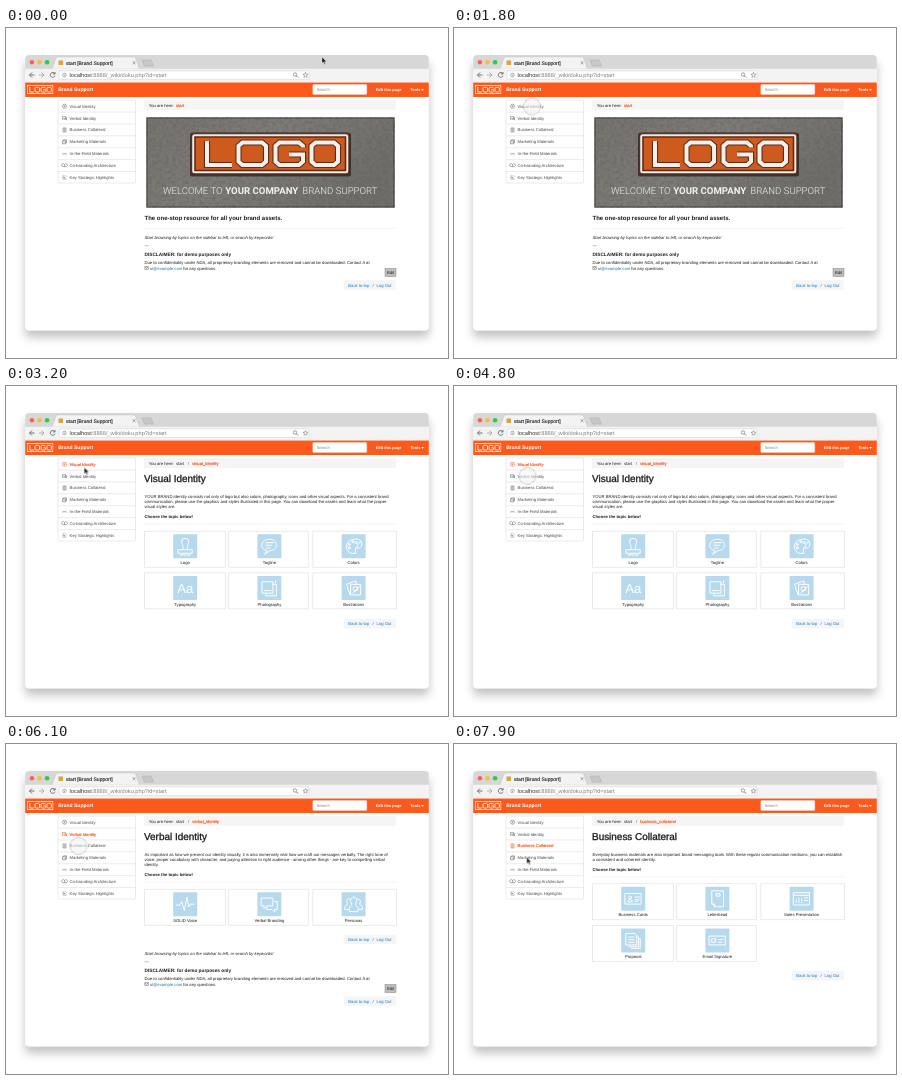
An HTML page that plays this animation: 442x330 px, repeating every 8 s.

```html
<!DOCTYPE html>
<html lang="en">
<head>
<meta charset="utf-8">
<title>Brand Support</title>
<style>
html, body { margin: 0; width: 100%; height: 100%; overflow: hidden; background: #fff; }
svg { display: block; width: 442px; height: 330px; }
text { font: 4.2px "Liberation Sans", Arial, sans-serif; fill: #1c1c1c; text-rendering: geometricPrecision; white-space: pre; }
.b { font-weight: bold; }
.i { font-style: italic; }
.h { font-size: 9.95px; fill: #1c1c1c; stroke: #1c1c1c; stroke-width: .32px; }
.w { font-size: 3.95px; font-weight: bold; fill: #fff; }
.o { fill: #f4571d; stroke: #f4571d; stroke-width: .16px; }
.l { fill: #1f76bb; }
.g { fill: #4a4a4a; }
.s { font: 300 9.6px Roboto, sans-serif; fill: #f3f2f0; }
.line { fill: none; stroke: #ddd; stroke-width: .6; }
.icon { fill: none; stroke: #fff; stroke-width: 1.1; stroke-linejoin: round; stroke-linecap: round; }
.mini { fill: none; stroke: #666; stroke-width: .55; }
.tool { fill: none; stroke: #666; stroke-width: .9; }

.page { visibility: hidden; animation: 8s step-end infinite; }
.start { animation-name: start; }
.visual { animation-name: visual; }
.verbal { animation-name: verbal; }
.business { animation-name: business; }
@keyframes start { 0% { visibility: visible } 23.75%, 100% { visibility: hidden } }
@keyframes visual { 0% { visibility: hidden } 23.75% { visibility: visible } 61.25%, 100% { visibility: hidden } }
@keyframes verbal { 0% { visibility: hidden } 61.25% { visibility: visible } 81.25%, 100% { visibility: hidden } }
@keyframes business { 0% { visibility: hidden } 81.25%, 100% { visibility: visible } }

.pointer { animation: move 8s ease-in-out infinite; }
.arrow { animation: arrow 8s step-end infinite; }
.ring { opacity: 0; animation: ring 8s linear infinite; }
@keyframes move {
  0% { transform: translate(316px, 29px) }
  20.5%, 35% { transform: translate(78px, 78.5px) }
  40% { transform: translate(78.3px, 81.5px) }
  57%, 68.75% { transform: translate(73.5px, 90px) }
  74.5%, 90.5% { transform: translate(72.5px, 102px) }
  98.5%, 100% { transform: translate(72.7px, 113.3px) }
}
@keyframes arrow {
  0% { opacity: 1 } 21.25% { opacity: 0 } 28.75% { opacity: 1 }
  58.75% { opacity: 0 } 63.75% { opacity: 1 }
  75% { opacity: 0 } 86.25%, 100% { opacity: 1 }
}
@keyframes ring {
  0%, 21% { opacity: 0 } 22%, 23.7% { opacity: 1 } 28.75%, 58.4% { opacity: 0 }
  59.5%, 61.2% { opacity: 1 } 63.75%, 74.8% { opacity: 0 }
  75.6%, 81.2% { opacity: 1 } 86.25%, 100% { opacity: 0 }
}
</style>
</head>
<body>
<svg id="stage" viewBox="0 0 442 330" xmlns="http://www.w3.org/2000/svg"></svg>
<script>
const t = (x, y, s, c = '', more = '') => `<text x="${x}" y="${y}" class="${c}" ${more}>${s}</text>`;
const r = (x, y, w, h, fill, more = '') => `<rect x="${x}" y="${y}" width="${w}" height="${h}" fill="${fill}" ${more}/>`;
const p = (d, more = '') => `<path d="${d}" ${more}/>`;
const size = n => `style="font-size:${n}px"`;

const icons = {
  Logo: p('M-8 4H8V8H-8ZM-6 10H6M-3 4C-1 0-4-2-4-5A4 4 0 0 1 4-5C4-2 1 0 3 4'),
  Tagline: p('M-3 5C-12 4-10-8 0-8S11 4 1 5L-5 9ZM-4-4H5M-4-1H3M-4 2H1'),
  Colors: p('M2 8C-10 11-12-6 0-8S11 3 5 2S4 7 2 8ZM2 3L8-6')
    + [[-5, 2], [-5, -2], [-1, -5], [3, -4]].map(([x, y]) => `<circle cx="${x}" cy="${y}" r="1.2"/>`).join(''),
  Typography: `<text x="0" y="5.4" text-anchor="middle" style="font-size:15px;fill:#fff;stroke:none">Aa</text>`,
  Photography: p('M-8-7H4V6H-8ZM4-4H8V9H-4V6M-6 3H2M7-8V-6'),
  Illustrations: p('M-8-4L2-8L4-4M-8-4L-4 8M-3-4H8V8H-3ZM-1 6L7-2') + '<circle cx="2" cy="1" r="2.6"/>',
  'SOLID Voice': p('M-10 1H-6L-4-3L-1 7L2-8L4 3L6 0H10'),
  'Verbal Branding': p('M-9-7H4V2H-3L-6 5V2H-9ZM6-3H9V6H6V9L3 6H-3V4'),
  Personas: p('M-5 8V5C-5 2-2 2-2 0C-5-4-3-8 0-8S5-4 2 0C2 2 5 2 5 5V8ZM-6 6H-10V3C-9 1-6 1-7-1C-9-4-7-6-4-6M6 6H10V3C9 1 6 1 7-1C9-4 7-6 4-6'),
  'Business Cards': p('M-9-6H9V6H-9ZM-6 3C-6 0-1 0-1 3ZM2-2H7M2 1H7M2 3H5') + '<circle cx="-3.5" cy="-1.5" r="1.7"/>',
  Letterhead: p('M-6-9H7V9H-3L-6 6ZM-6 6H-3V9M-1-6H3V-3H-1Z'),
  'Sales Presentation': p('M-9-7H9V7H-9ZM-9-4H9M-6 4V1M-3 4V-1M0 4V0M3-1H7M3 2H7'),
  Proposal: p('M-8-8H2L4-6V5H-8ZM4-4H6V7H-5M6-2H8V9H-2M-5-4H1M-5-1H1M-5 2H1'),
  'Email Signature': p('M-9-5H9V5H-9ZM-6-2H-2V2H-6ZM1-1H6M1 2H5')
};

const menu = [
  ['Visual Identity', 'M-2 0A2 2 0 1 0 2 0A2 2 0 1 0-2 0M-.7 0H.7M0-.7V.7'],
  ['Verbal Identity', 'M-2-1.5H1V.7H-1L-2 1.5ZM1-.5H2V2L1 1H-.5'],
  ['Business Collateral', 'M-1.5-2H1.5V2H-1.5ZM-.7-1H.7M-.7 0H.7M-.7 1H.7'],
  ['Marketing Materials', 'M-2-1H1V2H-2ZM-1-1V-2H2V1H1M-1 .5H0'],
  ['In-the-Field Materials', 'M-2-1L-1 0L-2 1M2-1L1 0L2 1M-1 0H1'],
  ['Co-branding Architecture', 'M-2 1A1.5 1.5 0 1 1 0-1A1.5 1.5 0 1 1 2 1ZM0-1V1'],
  ['Key Strategic Highlights', 'M-2-1.5H0M-2 0H1M-2 1.5H2M1-2L2-1']
];

const sidebar = active => r(52, 72, 77.5, 83, '#fff', 'class="line" rx="1"')
  + menu.map(([name, d], i) => {
    const y = 78.2 + i * 11.88;
    return (i ? p(`M52 ${y - 6}H129.5`, 'class="line"') : '')
      + p(d, `class="mini" transform="translate(58.5 ${y})"${i === active ? ' style="stroke:#f4571d"' : ''}`)
      + t(63.6, y + 1.5, name, i === active ? 'o' : 'g');
  }).join('');

const crumbs = id => r(138, 72, 252, 10, '#f5f5f5', 'rx="1"') + t(142.8, 79, 'You are here:')
  + (id ? t(170, 79, 'start') + t(182, 79, '/', 'g') + t(186.2, 79, id, 'o') : t(170, 79, 'start', 'o'));

const links = y => r(338, y, 52, 9.6, '#f4f5f6', 'rx="1"') + t(342.3, y + 6.3, 'Back to top', 'l')
  + t(366.5, y + 6.3, '/', 'g') + t(370.6, y + 6.3, 'Log Out', 'l');

const card = (name, i, top) => {
  const x = 138.5 + i % 3 * 84.2, y = top + (i > 2 ? 41.7 : 0);
  return r(x, y, [81, 79.5, 83.5][i % 3], 36, '#fff', 'class="line"')
    + `<g class="icon" transform="translate(${x + 40.7} ${y + 15})">${r(-12, -12, 24, 24, '#b7d9ed', 'stroke="none" rx="1"')}<g transform="scale(.88)">${icons[name]}</g></g>`
    + t(x + 40.7, y + 32.6, name, '', 'text-anchor="middle"');
};

const footer = t(138.5, 211, 'Start browsing by topics on the sidebar to left, or search by keywords!', 'i')
  + t(138.5, 219.3, '—')
  + t(138.5, 227.8, 'DISCLAIMER: for demo purposes only', 'b', size(4.75))
  + t(138.5, 236.4, 'Due to confidentiality under NDA, all proprietary branding elements are removed and cannot be downloaded. Contact A at')
  + p('M138.8 238.7H142.3V241.4H138.8ZL140.5 240.3L142.3 238.7', 'class="mini"')
  + t(143.8, 241.6, 'al@example.com', 'l') + t(177.3, 241.6, 'for any questions.')
  + r(379, 240.5, 11, 8, '#bdbdbd', 'stroke="#888" stroke-width=".5"') + t(380.9, 246, 'Edit')
  + links(252.2);

const topic = (cls, active, title, lines, top, names, linkY, extra = '') => `<g class="page ${cls}">`
  + sidebar(active) + crumbs(title.toLowerCase().replace(' ', '_')) + t(138, 96.4, title, 'h')
  + lines.map((s, i) => t(138.5, 111.8 + i * 5.2, s)).join('')
  + t(138.5, top - 13.3, 'Choose the topic below!', 'b')
  + p(`M138 ${top - 7}H390`, 'class="line" style="stroke:#eee"')
  + names.map((n, i) => card(n, i, top)).join('') + links(linkY) + extra + '</g>';

const banner = r(140.5, 89.5, 248, 90, 'url(#concrete)') + r(140.5, 89.5, 248, 90, '#000', 'filter="url(#grain)" opacity=".5"')
  + r(141, 90, 247, 89, 'none', 'stroke="#454340" stroke-width="1"')
  + r(184, 105, 161, 43.5, '#221d1b', 'rx="2" opacity=".7"')
  + r(185, 105, 158.5, 41.5, '#cf5a1d', 'rx="2" stroke="#3c2a22" stroke-width="1.2"')
  + r(187.5, 107.5, 153.5, 36.5, 'none', 'rx="1.5" stroke="#5a2d18" stroke-width="4.6"')
  + r(187.2, 107.2, 154.1, 37.1, 'none', 'rx="1.5" stroke="#efe9e4" stroke-width="2"')
  + '<use href="#mark" fill="none" stroke="#5a2d18" stroke-width="6.2"/>'
  + '<use href="#mark" fill="none" stroke="#f5efe9" stroke-width="4"/>'
  + t(157, 166.3, 'WELCOME TO', 's') + t(219.3, 166.3, 'YOUR COMPANY', 's', 'style="font-weight:700"')
  + t(296.3, 166.3, 'BRAND SUPPORT', 's');

const defs = `<defs>
<linearGradient id="concrete" x2="1" y2=".4"><stop stop-color="#76736f"/><stop offset=".5" stop-color="#7f7c78"/><stop offset="1" stop-color="#706d6a"/></linearGradient>
<filter id="grain" x="0" y="0" width="1" height="1"><feTurbulence type="fractalNoise" baseFrequency=".3" numOctaves="3" seed="4"/><feColorMatrix values="0 0 0 0 .12  0 0 0 0 .12  0 0 0 0 .11  2.6 0 0 0 -1"/></filter>
<filter id="shade" x="-10%" y="-10%" width="120%" height="125%"><feDropShadow dx="0" dy="7" stdDeviation="5" flood-opacity=".24"/></filter>
<path id="mark" d="M201 113V137H226M236.5 114.5H256L260 118V133.5L256 137H236.5L232.5 133.5V118ZM297 119.5V118L293 114.5H273.5L269.5 118V133.5L273.5 137H293L297 133.5V126.5H283M309.5 114.5H328L332 118V133.5L328 137H309.5L305.5 133.5V118Z"/>
</defs>`;

const lights = ['#fc605c', '#fdbc40', '#34c84a'].map((c, i) => `<circle cx="${25.9 + i * 7.6}" cy="34.2" r="2.3" fill="${c}"/>`).join('');

const chrome = r(19.2, 27, 403.6, 275.3, '#fff', 'rx="4" filter="url(#shade)"')
  + p('M19.2 41V31Q19.2 27 23.2 27H418.8Q422.8 27 422.8 31V41Z', 'fill="#d8d7d8"') + lights
  + p('M46 41L50 30Q50.5 29 52 29H127.5Q129 29 129.5 30L133.5 41Z', 'fill="#f3f3f3" stroke="#bbb" stroke-width=".4"')
  + p('M136 32H145L147.5 38H138.5Z', 'fill="#c8c8c8" stroke="#aaa" stroke-width=".5"')
  + r(52.5, 32.5, 4.5, 4.5, '#d9a441') + t(60, 36.7, 'start [Brand Support]', '', 'style="font-size:5.05px;stroke:#1c1c1c;stroke-width:.12"')
  + p('M126.7 33.3L129.5 36.1M129.5 33.3L126.7 36.1', 'class="tool" style="stroke-width:.6"')
  + r(19.2, 40.8, 403.6, 13.2, '#f3f3f3')
  + p('M28.5 47H23.5M26 44.5L23.5 47L26 49.5', 'class="tool"')
  + p('M33 47H38M35.5 44.5L38 47L35.5 49.5', 'class="tool" style="stroke:#aaa"')
  + p('M48.7 45.5A2.4 2.4 0 1 0 49 47.7M49 44V46H47', 'class="tool"')
  + r(53, 42.8, 250, 8.6, '#fff', 'rx="1.5" stroke="#ccc" stroke-width=".5"')
  + '<circle cx="58.5" cy="47" r="1.8" class="tool" style="stroke-width:.5"/>'
  + p('M58.5 46.8V48M58.5 45.9V46.3', 'class="tool" style="stroke-width:.5"')
  + t(63.5, 48.9, '<tspan fill="#333">localhost</tspan>:8888/_wiki/doku.php?id=start', '', 'style="font-size:5.65px;fill:#808080"')
  + '<circle cx="289" cy="46.5" r="1.7" class="tool" style="stroke-width:.6"/>'
  + p('M290.3 47.8L292 49.5', 'class="tool"')
  + p('M299.5 44.4L300.2 46.2L302.1 46.3L300.6 47.5L301.1 49.4L299.5 48.3L297.9 49.4L298.4 47.5L296.9 46.3L298.8 46.2Z', 'class="tool" style="stroke-width:.5"')
  + r(19.2, 54.5, 403.6, 14.5, '#fb5a1c')
  + `<g transform="translate(21.2 57) scale(.164 .21) translate(-185 -103.5)" fill="none" stroke="#fff">${r(187, 106, 154.5, 38, 'none', 'stroke-width="3.5"')}<use href="#mark" stroke-width="4.5"/></g>`
  + t(52.2, 63.3, 'Brand Support', 'w', size(5))
  + r(306.8, 56.5, 54, 10, '#fff', 'rx="1" stroke="#ddd" stroke-width=".4"') + t(310.5, 63, 'Search', '', 'style="fill:#888"')
  + t(369.7, 63, 'Edit this page', 'w') + t(404.2, 63, 'Tools', 'w')
  + p('M415 61H418.2L416.6 62.8Z', 'fill="#fff"');

const startPage = `<g class="page start">${sidebar(-1)}${crumbs('')}${banner}`
  + t(138.5, 192.2, 'The one-stop resource for all your brand assets.', 'b', size(6))
  + p('M138 200.5H390', 'class="line" style="stroke:#eee"') + footer + '</g>';

const pages = startPage
  + topic('visual', 0, 'Visual Identity', [
    'YOUR BRAND identity consists not only of logo but also colors, photography, icons and other visual aspects. For a consistent brand',
    'communication, please use the graphics and styles illustrated in this page. You can download the assets and learn what the proper',
    'visual styles are.'
  ], 145.2, ['Logo', 'Tagline', 'Colors', 'Typography', 'Photography', 'Illustrations'], 232.8)
  + topic('verbal', 1, 'Verbal Identity', [
    'As important as how we present our identity visually, it is also immensely vital how we craft our messages verbally. The right tone of',
    'voice, proper vocabulary with character, and paying attention to right audience - among other things - are key to compelling verbal',
    'identity.'
  ], 145.2, ['SOLID Voice', 'Verbal Branding', 'Personas'], 190.7, footer)
  + topic('business', 2, 'Business Collateral', [
    'Everyday business materials are also important brand messaging tools. With these regular communication mediums, you can establish',
    'a consistent and coherent identity.'
  ], 139.8, ['Business Cards', 'Letterhead', 'Sales Presentation', 'Proposal', 'Email Signature'], 226.8);

const pointer = `<g class="pointer">
<circle class="ring" r="8.5" fill="#f2f2f2" fill-opacity=".55" stroke="#b4b4b4" stroke-width=".6"/>
${p('M0 0V6.3L1.5 5L2.5 7.4L3.5 7L2.5 4.7H4.5Z', 'class="arrow" fill="#111" stroke="#fff" stroke-width=".4"')}
</g>`;

document.getElementById('stage').innerHTML = defs + chrome + pages + pointer;
</script>
</body>
</html>
```
